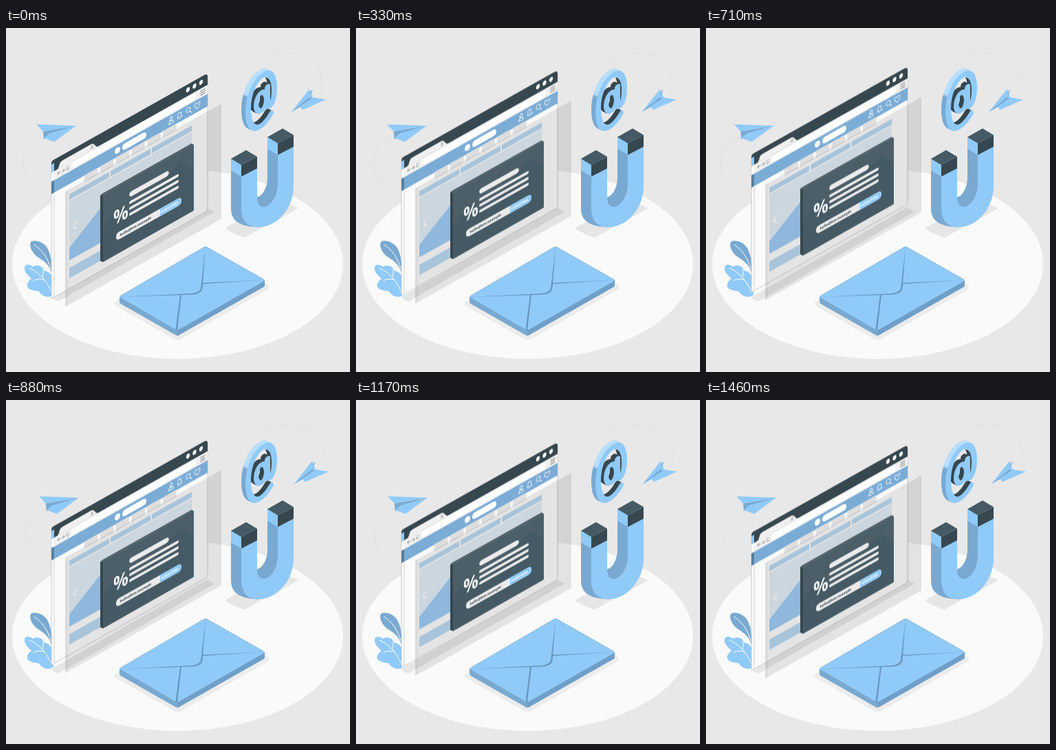
Animation, 500 px wide and 500 px high, one loop 1.5 s. Source, as an HTML page:

```html
<!DOCTYPE html>
<html lang="en">
<head>
<meta charset="utf-8">
<title>Email marketing</title>
<style>
  html, body { margin: 0; width: 100%; height: 100%; overflow: hidden; background: #e8e8e8; }
  svg { display: block; width: 100%; height: 100%; }
  text { font-family: "Open Sans", Inter, sans-serif; font-weight: 700; }
  .b { fill: #90caf9; }
  .m { fill: #79a9d1; }
  .d { fill: #37474f; }
  .t { fill: #455a64; }
  .w { fill: #fff; }
  .line { fill: none; stroke-linecap: round; stroke-linejoin: round; }
  .dash { fill: none; stroke: #d9d9d9; stroke-dasharray: 4 3.5; }
</style>
</head>
<body>
<svg viewBox="0 0 500 500">
  <defs>
    <linearGradient id="rim" x1="0" y1="0" x2="0" y2="1">
      <stop offset=".24" stop-color="#b9defb"/>
      <stop offset=".28" stop-color="#79a9d1"/>
    </linearGradient>
    <path id="ring" d="M14 27C8 34 3 36-2 36C-14 36-19 20-19 2C-19-20-9-36 3-36C14-36 19-22 19-6C19 6 16 14 13 14C10 14 9 10 9 6V-15"/>
    <g id="at" stroke-width="8">
      <use href="#ring"/>
      <ellipse cy="1" rx="7.500" ry="13" stroke-width="7"/>
    </g>
    <clipPath id="hole"><ellipse rx="17" ry="33"/></clipPath>
  </defs>

  <rect width="500" height="500" fill="#e8e8e8"/>
  <ellipse cx="249.500" cy="343" rx="240.500" ry="138" fill="#fafafa"/>

  <g fill="#e6e6e6">
    <path d="M66 391L292 261L303 267L77 397Q70 397 66 391Z"/>
    <path d="M320 290L395 248L425 262L346 305Q333 300 320 293Z"/>
    <path d="M158 399L290 322L382 374V379L253 453H246L158 403Z" fill="#ececec"/>
  </g>

  <!-- leaves -->
  <path class="m" d="M36 311C41 307 52 310 58 317C65 326 67 340 66 355C62 344 56 339 48 334C39 329 33 318 36 311Z"/>
  <path class="b" d="M27 348C28 343 34 343 39 347C45 343 54 346 56 353C61 353 65 357 67 362L69 388C62 393 53 391 48 383C42 381 34 382 31 376C30 370 34 367 37 364C32 360 26 354 27 348Z"/>
  <g class="line" stroke="#fff">
    <path d="M41 315C52 322 61 334 65 350"/>
    <path d="M34 349C48 355 58 366 66 383M53 362Q55 356 54 350M56 366Q47 363 40 367"/>
  </g>

  <g id="win">
    <g transform="matrix(1 -.563 0 1 66 194.500)">
      <path d="M0 4Q0 0 3 0H222Q227 0 227 5V194Q227 199 223 199H1Q0 199 0 197Z" fill="#fafafa" stroke="#bdbdbd" stroke-width=".8"/>
      <path d="M0 16V3Q0 -1 3 -1H222Q227 -1 227 4V16Z" class="d"/>
      <path d="M4 16H227V29H4Z" fill="#f0f0f0"/>
      <path d="M9 16Q11 14 12 10Q13 7 16 7H58Q61 7 63 11Q65 16 69 16Z" fill="#f0f0f0"/>
      <path d="M0 4H4V16H0Z" class="b"/>
      <path d="M0 16H4V29H0Z" fill="#fafafa"/>
      <path d="M4 29H227V47H4Z" fill="#7bacd6"/>
      <path d="M0 29H4V47H0Z" fill="#587f9f"/>
      <path d="M4 47V198" stroke="#c6c6c6" stroke-width=".8"/>
      <g class="w" id="dots"></g>
      <rect x="29" y="18" width="181" height="9" rx="4" class="w"/>
      <g class="line" stroke="#777" stroke-width=".6">
        <path d="M13 22.500H9L10.500 20.500M9 22.500L10.500 24.500M15 22.500H19L17.500 20.500M19 22.500L17.500 24.500M25.500 21A2 2.600 0 1 0 25.500 24"/>
        <path d="M57.500 10L60.500 14M60.500 10L57.500 14"/>
        <path d="M217 19.500H223M217 22.500H223M217 25.500H223" stroke-width="1.100"/>
      </g>
      <ellipse cx="96" cy="37.500" rx="4" ry="4.500" class="w"/>
      <rect x="103" y="33" width="35" height="9.500" rx="4.500" class="w"/>
      <g class="line" stroke="#fff" stroke-width=".8">
        <ellipse cx="174" cy="35" rx="2" ry="2.500"/>
        <path d="M170.500 42Q171 38 174 38Q177 38 177.500 42Z"/>
        <path d="M183 40.500Q184 39 184 36Q184 33 186 33Q188.500 33 188.500 36Q188.500 39 190 40.500ZM185.500 42.500H187"/>
        <ellipse cx="199" cy="36.500" rx="3" ry="3.500"/>
        <path d="M201.200 39.500L204 43"/>
        <path d="M212 42C206 37 208 33 210 33.500Q211.500 34 212 35.500Q212.500 34 214 33.500C216.500 33 217.500 37 212 42Z"/>
      </g>
      <g id="page"></g>
      <path d="M26 72H204V158H26Z" fill="#e0ebf4"/>
      <path d="M26 140L97 89L125 128L162 90L204 140V158H26Z" fill="#9dcaf2"/>
      <path d="M36.500 107.500L32 113L36.500 118" class="line" stroke="#fff" stroke-width="1.800"/>

      <!-- glass sheet -->
      <path d="M20 54H247V222H20Z" fill="#000" opacity=".09"/>
      <path d="M20 54H24V222H20Z" fill="#000" opacity=".035"/>
      <path d="M20 54H247" stroke="#fff" opacity=".35"/>

      <!-- popup -->
      <path d="M71 89L74 88H204L207 92V187L75 188L71 184Z" class="d"/>
      <path d="M72 88.500H203L207 92H75Z" fill="#54666f"/>
      <rect x="75" y="91.500" width="132" height="96" rx="2" fill="#4c5f69"/>
      <path d="M75 140L97 120L125 146L150 128L187 105L207 128V186H75Z" class="t"/>
      <g class="line" stroke="#ebebeb" stroke-width="4.200">
        <path d="M117 112H167" stroke-width="7.500"/>
        <path d="M115 123.500H183M115 132H183M115 140.500H183"/>
      </g>
      <rect x="94" y="157" width="95" height="11" rx="5" fill="#ebebeb"/>
      <path d="M158 157H184Q189 157 189 162.500T184 168H158Z" class="b"/>
    </g>
    <g transform="matrix(.866 -.4876 0 1 66 194.500)">
      <text x="104" y="143.500" font-size="28" fill="#f2f2f2">%</text>
      <text x="115" y="164.500" font-size="5.400" class="d">hello@box.example</text>
      <text x="184" y="164.700" font-size="5.300" class="w">SUBSCRIBE</text>
    </g>
  </g>

  <!-- magnet -->
  <path class="m" d="M327 190L342 199L368 289.500C342 289 327 282 327 262Z"/>
  <path class="m" d="M380 158L395 167V230C395 247 382 261 374 261C366 260 364 253 364 246C372 246 380 232 380 218Z"/>
  <path class="b" d="M342 199L365 187V245C365 255 368 260 375 260C383 260 395 247 395 229V167L418 156V230C418 262 394 289 368 289.500C352 290 342 281 342 262Z"/>
  <g id="tips"></g>

  <!-- at sign -->
  <g transform="matrix(1 -.577 0 1 371 106)" class="line">
    <g id="depth" stroke="url(#rim)" stroke-width="8"></g>
    <g clip-path="url(#hole)">
      <ellipse rx="17" ry="33" fill="#e8e8e8"/>
      <g id="walls" stroke="#37474f"></g>
    </g>
    <use href="#at" stroke="#90caf9"/>
  </g>

  <!-- envelope -->
  <path class="m" d="M165 390V398Q165 400 167 401L246 446Q249 448 252 446L375 376Q376 375 376 373V366L249 430Z"/>
  <path d="M249 438V447.500L375 376Q376 375 376 373V366Z" fill="#6f9fc8"/>
  <path class="b" d="M167 389L287 319Q290 317 293 319L374 365Q377 367 374 368.500L252 438Q249 440 246 438L167 392Q164 391 167 389Z"/>
  <g fill="#6995bb">
    <path d="M165 391L269 386Q280 385 283 379L290 318L285.500 379Q283 387 271 387.500Z"/>
    <path d="M285 370.500L376 366.200L285 372Z"/>
    <path d="M253 387.500H255L249 439H246.500Z"/>
  </g>
  <path class="line" d="M167 389L287 319Q290 317 293 319L374 365" stroke="#6995bb" stroke-width=".5"/>

  <g id="planes">
    <path class="dash" d="M60 157C36 160 24 178 25 198C26 216 36 228 49 230"/>
    <path class="dash" d="M365 46C387 36 420 31 443 45C459 56 462 77 456 96"/>
    <path class="b" d="M44.500 140L102 142L54 150.500Z"/>
    <path class="m" d="M54 150.500L102 142L63 154L55 162Z"/>
    <path class="b" d="M102 142L63 153L55 160L70 165.500Z"/>
    <path class="b" d="M415 122L441 89L446 101Z"/>
    <path class="m" d="M415 122L446 89L441 101L448 103L427 115Z"/>
    <path class="b" d="M415 122L441 89L443 99Z"/>
    <path class="b" d="M446 101L465 104L431 119L427 114Z"/>
  </g>
</svg>
<script>
  const $ = id => document.getElementById(id);
  const rect = (x, y, w, h, fill) =>
    `<rect x="${x}" y="${y}" width="${w}" height="${h}" fill="${fill}"/>`;

  $('dots').innerHTML = [198.5, 208, 217.5]
    .map(x => `<ellipse cx="${x}" cy="7" rx="2.700" ry="3.400"/>`).join('');

  let page = '';
  for (let i = 0; i < 6; i++) {
    page += rect(48 + i * 22.8, 46.5, 19.5, 10, '#dedede');
  }
  for (let i = 0; i < 3; i++) {
    const x = 26 + i * 60;
    page += rect(x, 62, 58, 8, '#b9d7f0') + rect(x, 169, 58, 15, '#b9d7f0');
  }
  $('page').innerHTML = page;

  // end caps of the two arms
  const tip = (x, y) => `
    <path class="b" d="M${x} ${y}l15 9v17l-15 -9z"/>
    <path class="d" d="M${x + 15} ${y + 9}l23 -12v17l-23 12z"/>
    <path class="t" d="M${x} ${y}l22 -12.500l16 9.500l-23 12z"/>`;
  $('tips').innerHTML = tip(327, 190) + tip(380, 158.5);

  // copies of a shape stacked backwards to give it thickness
  const extrude = (id, n) => {
    let s = '';
    for (let i = n; i > 0; i--) s += `<use href="#${id}" x="${-i}" y="${-i * 1.1}"/>`;
    return s;
  };
  $('depth').innerHTML = extrude('ring', 6);
  $('walls').innerHTML = extrude('at', 6);

  const loop = { duration: 1500, iterations: Infinity };
  $('win').animate(
    [0, -10, 0].map(y => ({ transform: `translateY(${y}px)` })), loop);
  $('planes').animate(
    [0, -1, 2, -4, 4, -4, 4, -4, 2, -1, 0].map(x => ({
      transform: `translateX(${x}px)`,
      easing: 'cubic-bezier(.36,.07,.19,.97)'
    })), loop);
</script>
</body>
</html>
```
